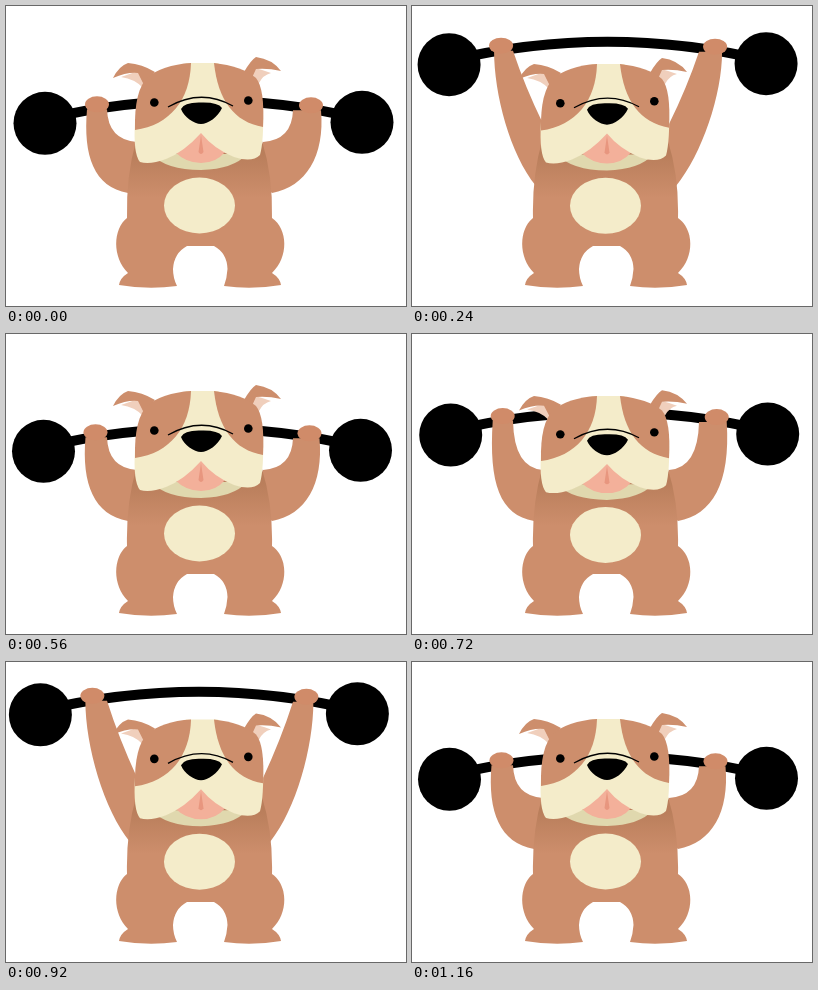
These frames come from a looping animation (400x300 px, 1200 ms). An HTML page:

```html
<!DOCTYPE html>
<html lang="en">
<head>
<meta charset="utf-8">
<title>Dog lifting a barbell</title>
<style>
html, body { margin: 0; width: 100%; height: 100%; overflow: hidden; background: #fff; }
svg { display: block; width: 100vw; height: 100vh; }
.fur { fill: #cd8e6c; }
.cream { fill: #f4ecca; }
.ear { fill: #f0cfbc; }
</style>
</head>
<body>
<svg viewBox="0 0 400 300">
  <defs>
    <linearGradient id="shade" gradientUnits="userSpaceOnUse" x1="0" y1="148" x2="0" y2="192">
      <stop offset="0" stop-color="#b97e5b"/>
      <stop offset="1" stop-color="#cd8e6c"/>
    </linearGradient>
  </defs>

  <g id="bar">
    <path d="M0-4Q158.500-42 317-4" fill="none" stroke="#000" stroke-width="10"/>
    <circle r="31.500"/>
    <circle cx="317" cy="-1" r="31.500"/>
  </g>
  <path id="armL" class="fur"/>
  <path id="armR" class="fur" transform="matrix(-1 0 0 1 388 0)"/>
  <g id="hands" fill="#d08b69">
    <ellipse cx="52" cy="-19" rx="12" ry="8"/>
    <ellipse cx="266" cy="-18" rx="12" ry="8"/>
  </g>

  <path fill="url(#shade)" d="M130 135Q120 170 121 212C107 223 106 251 122 267Q114 272 113 279Q142 284 171 280
    Q167 272 167 263Q168 247 181 240H208Q221 247 221.500 263Q221 272 218 280Q246 284 275 279
    Q274 272 266 267C283 251 282 223 266 212Q267 170 256 135Z"/>
  <ellipse id="belly" class="cream" cx="193.500" cy="199.500" rx="35.500" ry="28"/>

  <g id="head">
    <path class="ear" d="M115 71L132 65L144 70L137 82Q129 73 115 71Z"/>
    <path class="fur" d="M107 72Q113 60 122 57Q136 58 149 66L138 79L132 67Q121 66 107 72Z"/>
    <path class="ear" d="M243 76L249 62Q257 64 265 67Q257 69 253 77Z"/>
    <path class="fur" d="M238 66Q245 54 250 51Q266 53 275 65Q262 62 250 63L245 74Z"/>
    <path fill="#e0d8ae" d="M145 148Q160 164 195 164Q228 163 241 148Z"/>
    <path fill="#f3b09a" d="M195 126L169 146Q180 157 195 157Q210 157 219 146Z"/>
    <path fill="#e8967f" d="M195 129L197.500 146Q195 150 192.500 146Z"/>
    <path class="cream" d="M180 57H212L257 100Q258 135 254 149Q246 157 228 151Q208 143 195 127
      Q178 146 160 153Q144 159 134 156Q127 148 129 115Z"/>
    <path class="fur" d="M185 57C166 58 150 64 142 71Q128 84 129 124C164 119 184 94 185 57Z"/>
    <path class="fur" d="M208 57C226 59 241 64 250 72Q259 83 257 121C228 116 212 94 208 57Z"/>
    <path d="M162 101Q195 82 227 100" fill="none" stroke="#000" stroke-width="1.300"/>
    <path d="M175 103Q178 96 195 96.500Q212 96 216 102C212 111 202 118 195 118C188 118 178 111 175 103Z"/>
    <circle cx="148.300" cy="96.500" r="4.300"/>
    <circle cx="242.300" cy="94.500" r="4.300"/>
  </g>
</svg>
<script>
const LOOP = 1200, STEP = 40;
const REST_Y = 117.3;
const LIFTS = [
  { start: 0, peak: 260, end: 560, height: 64, drift: 2.3 },
  { start: 640, peak: 930, end: 1160, height: 67, drift: 5 }
];
const [bar, hands, head, belly, armL, armR] =
  ['bar', 'hands', 'head', 'belly', 'armL', 'armR'].map(id => document.getElementById(id));

const mix = (a, b, k) => a + (b - a) * k;
const clamp = k => Math.max(0, Math.min(1, k));

function pose(t) {
  const lift = LIFTS.findLast(l => l.start <= t);
  const { start, peak, end, height, drift } = lift;
  const rising = t < peak;
  // k is how far the bar is raised, 0 to 1.
  const k = rising
    ? ((t - start) / (peak - start)) ** 1.1
    : clamp((end - t) / (end - peak)) ** 1.8;
  return {
    x: rising ? 39 - drift * k * k : mix(37.5, 39 - drift, k),
    y: REST_Y - height * k,
    bend: 1 - clamp(rising ? (k - 0.35) / 0.5 : k / 0.3),
    squash: rising ? 5.2 * Math.sin(Math.PI * k ** 0.7) : 0
  };
}

// Left arm outline from hand (x, y) to shoulder; b is 0 straight, 1 bent.
function arm(x, y, b) {
  const endY = mix(103 + 0.37 * y, 136, b);
  const outer = [
    [x - mix(7, 10, b), y + 5],
    [x - mix(7, 14, b), mix(y + 0.35 * (178 - y), 150, b)],
    [mix(98, 88, b), mix(148, 181, b)],
    [mix(124, 122, b), mix(180, 187, b)]
  ];
  const inner = [mix(113, 102, b), mix((y + endY) / 2 + 2, 134, b)];
  return `M${outer[0]}C${outer.slice(1).join(' ')}L140 170L131 ${endY}Q${inner} 101 ${y + 5}Z`;
}

function draw(now) {
  const { x, y, bend, squash } = pose(Math.floor(now % LOOP / STEP) * STEP);
  for (const part of [bar, hands]) part.setAttribute('transform', `translate(${x} ${y})`);
  armL.setAttribute('d', arm(x + 52, y - 19, bend));
  armR.setAttribute('d', arm(122 - x, y - 18, bend));
  belly.setAttribute('cy', 199.5 + 0.3 * squash);
  head.setAttribute('transform',
    `translate(0 ${164 + 0.4 * squash}) scale(1 ${1 - 0.006 * squash}) translate(0 -164)`);
}

const start = performance.now();
function tick() {
  draw(performance.now() - start);
  requestAnimationFrame(tick);
}
tick();
</script>
</body>
</html>
```
